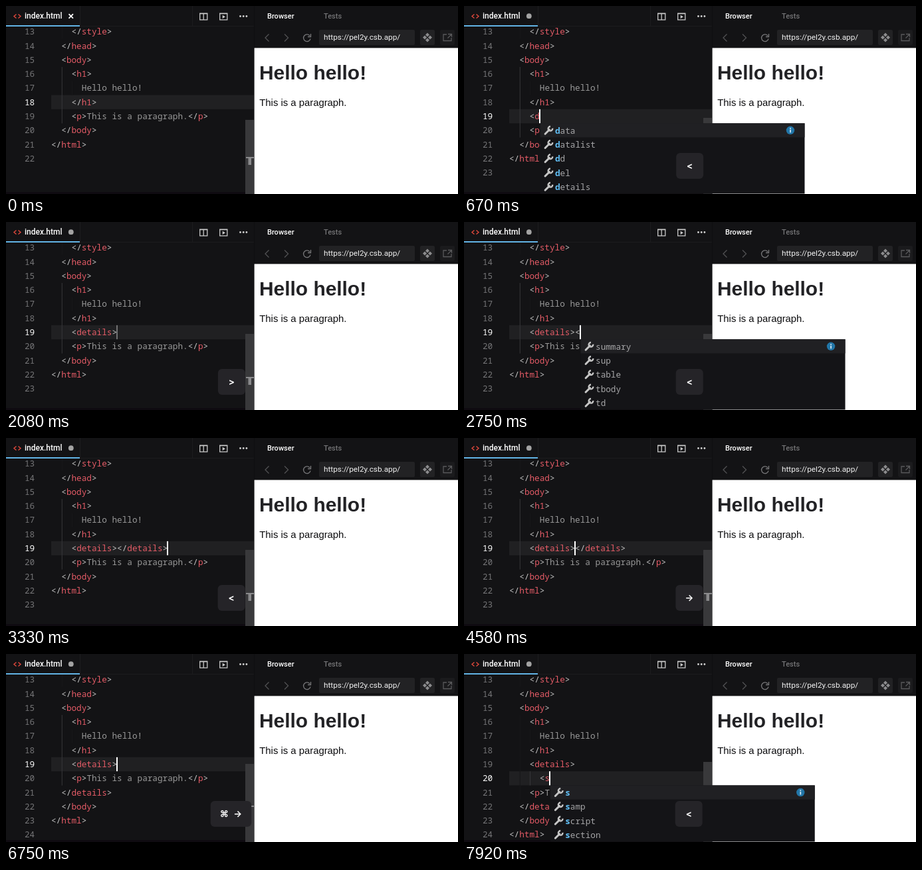
An HTML page for the animation above (8 s loop, 680 by 284 pixels).

```html
<!DOCTYPE html>
<html lang="en">
<head>
<meta charset="utf-8">
<title>Typing in a code editor</title>
<style>
  html, body { margin: 0; width: 100%; height: 100%; overflow: hidden; background: #131315; }
  svg { display: block; width: 680px; height: 284px; }
  text { white-space: pre; font: 500 12px Roboto, Inter, sans-serif; }
  .code text { font: 12.7px "Noto Sans Mono", "DejaVu Sans Mono", monospace; }
  .key { font: 700 13.5px Inter, "DejaVu Sans", sans-serif; fill: #fff; text-anchor: middle; }
  .tab { font-size: 11px; }
  .page { font-family: "Liberation Sans", Arial, sans-serif; font-weight: 400; }
  .line { fill: none; stroke: #c9c9c9; stroke-width: 1.3; }
</style>
</head>
<body>
<svg viewBox="0 0 680 284">
  <defs>
    <clipPath id="pane"><rect y="31" width="373" height="253"/></clipPath>
    <g id="wrench" fill="none" stroke="#c6c6c6">
      <path d="M1.6 12.4L8 6" stroke-width="3" stroke-linecap="round"/>
      <path d="M12.7 4A3.3 3.3 0 1 1 9.5 1.2" stroke-width="2.4"/>
    </g>
  </defs>
  <rect width="680" height="284" fill="#131315"/>
  <rect y="281" width="373" height="3" fill="#0f0b11"/>

  <path d="M15.5 12.5L12 15.5L15.5 18.5M18.5 12.5L22 15.5L18.5 18.5" fill="none" stroke="#e0483c" stroke-width="1.4"/>
  <text x="28" y="19.3" fill="#fff">index.html</text>
  <path id="close" d="M94.5 12.2L101 18.7M101 12.2L94.5 18.7" stroke="#fff" stroke-width="1.8"/>
  <circle id="unsaved" cx="97.8" cy="15.2" r="3.9" fill="#a3a3a3"/>
  <path d="M111.5 0V30.5H373M280.5 0V30" fill="none" stroke="#1c1c1e"/>
  <rect y="29" width="111" height="2" fill="#62b4e6"/>
  <g class="line">
    <path d="M291.7 11.2H302.8V20.8H291.7ZM297.2 11V21M291 11.7H303.5"/>
    <path d="M321.7 11.2H332.8V20.8H321.7ZM321 11.7H333.5"/>
  </g>
  <path d="M325.7 13.7L330 16.3L325.7 18.9Z" fill="#c9c9c9"/>
  <g fill="#d0d0d0"><circle cx="352.5" cy="15.5" r="1.4"/><circle cx="357.2" cy="15.5" r="1.4"/><circle cx="361.9" cy="15.5" r="1.4"/></g>

  <g class="code"><g id="editor" clip-path="url(#pane)"></g></g>

  <rect x="373" width="1" height="284" fill="#0e0e10"/>
  <text class="tab" x="393" y="19.3" fill="#fff">Browser</text>
  <text class="tab" x="478" y="19.3" fill="#747476">Tests</text>
  <g class="line" style="stroke:#515153">
    <path d="M395.5 42.5L390 48L395.5 53.5M419 42.5L424.5 48L419 53.5" stroke="#515153"/>
    <path d="M457.2 45.2A5.3 5.3 0 1 0 458 49.5M458.5 42V46.5H454" style="stroke:#767678"/>
  </g>
  <g fill="#222224">
    <rect x="471" y="36" width="144" height="23" rx="2"/>
    <rect x="623" y="36" width="22" height="23" rx="2"/>
    <rect x="653" y="36" width="22" height="23" rx="2" fill="#1b1b1d"/>
  </g>
  <text x="478" y="51.3" fill="#f2f2f2" style="font-size:11.8px;font-weight:400">https://pel2y.csb.app/</text>
  <path d="M634 40.5l3 3l-3 3l-3-3zM634 48.5l3 3l-3 3l-3-3zM630 44.5l3 3l-3 3l-3-3zM638 44.5l3 3l-3 3l-3-3z" fill="#8c8c8e"/>
  <path class="line" style="stroke:#59595b" d="M663 43H658V52.5H670V48M665 42.5H670.5V47M670.5 42.5L664.5 48.5"/>
  <rect x="373.6" y="63.4" width="307" height="221" fill="#fff"/>
  <text class="page" x="381" y="110.8" fill="#222225" style="font-size:29.9px;font-weight:700">Hello hello!</text>
  <text class="page" x="381.3" y="150.8" fill="#0c0c0e" style="font-size:14.85px">This is a paragraph.</text>

  <g id="popup" class="code"></g>
  <g id="keys"></g>
</svg>

<script>
const LOOP = 8000, FIRST = 13, LEFT = 68, CHAR = 7.63, ROW = 21.27;
const $ = id => document.getElementById(id);
const esc = s => s.replace(/</g, '&lt;').replace(/>/g, '&gt;');
const colX = col => LEFT + col * CHAR;
const rowY = line => 38.9 + (line - FIRST) * ROW;   // centre of a row
const indentOf = s => s.length - s.trimStart().length;

const rect = (x, y, w, h, fill, extra = '') =>
  `<rect x="${x}" y="${y}" width="${w}" height="${h}" fill="${fill}" ${extra}/>`;
const text = (x, y, body, fill = '#999', extra = '') =>
  `<text x="${x}" y="${y}" fill="${fill}" ${extra}>${body}</text>`;
const span = (s, fill) => `<tspan fill="${fill}">${esc(s)}</tspan>`;

// Editing actions: each changes the editor state
const type = s => e => {
  const old = e.lines[e.line - FIRST];
  e.lines[e.line - FIRST] = old.slice(0, e.col) + s + old.slice(e.col);
  e.col += s.length;
};
const newline = indent => e => {
  e.lines.splice(++e.line - FIRST, 0, ' '.repeat(indent));
  e.col = indent;
  e.dirty = true;
};
const go = (line, col) => e => { e.line = line; e.col = col; };
const select = (from, to) => e => { e.selection = [from, to]; e.col = to; };
const cut = e => {
  const [from, to] = e.selection, i = e.line - FIRST;
  e.lines[i] = e.lines[i].slice(0, from) + e.lines[i].slice(to);
  e.col = from;
  e.selection = null;
};
const paste = s => e => { e.lines[e.line - FIRST] = s; e.col = s.length; };
const press = keys => e => { e.keys = keys; };
const suggest = (items, match = 0) => e => {
  e.popup = items && { items: items.split(' '), match };
};

const TIMELINE = [
  [80, newline(4), press('↵')],
  [500, type('<'), press('<')],
  [580, suggest('a abbr address area article')],
  [670, type('d'), suggest('data datalist dd del details', 1)],
  [830, type('e'), suggest('del details', 2)],
  [920, type('t'), suggest('details', 3)],
  [1080, type('a'), suggest('details', 4)],
  [1170, type('i'), suggest('details', 5)],
  [1250, type('l'), suggest('details', 6)],
  [1420, type('s'), suggest('details', 7)],
  [1580, type('>'), suggest(''), press('>')],
  [2670, type('<'), press('<')],
  [2750, suggest('summary sup table tbody td')],
  [3000, type('/'), suggest('/details', 1)],
  [3330, type('details>'), suggest('')],
  [3750, go(19, 15), press('⌥←')],
  [4170, go(19, 12)],
  [4580, go(19, 13), press('→')],
  [4830, select(13, 23), press('⇧⌘→')],
  [5080, cut, press('⌘X')],
  [5330, go(20, 13), press('↓')],
  [5500, go(20, 31), press('⌘→')],
  [5830, newline(4), press('↵')],
  [6080, paste('  </details>'), press('⌘V')],
  [6330, go(20, 12), press('↑')],
  [6500, go(19, 12)],
  [6750, go(19, 13), press('⌘→')],
  [6920, newline(6), press('↵')],
  [7580, type('<'), press('<')],
  [7670, suggest('details summary sup table')],
  [7830, type('s'), suggest('s samp script section', 1)],
];

function stateAt(t) {
  const e = {
    lines: ['    </style>', '  </head>', '  <body>', '    <h1>', '      Hello hello!',
      '    </h1>', '    <p>This is a paragraph.</p>', '  </body>', '</html>', ''],
    line: 18, col: 9, keys: '', popup: null, selection: null, dirty: false,
  };
  for (const [at, ...actions] of TIMELINE) if (at <= t) actions.forEach(act => act(e));
  return e;
}

function caretOpacity(t) {
  if (t < 80) return 0;
  return t >= 2000 && t < 2670 ? Math.max(0, 1 - (t - 1920) / 250) : 1;
}

const highlight = code => code.replace(/(<\/?)(\w*)(>?)|[^<]+/g, (all, open, name, end) =>
  open ? span(open, '#c4c4c4') + span(name, '#e65c67') + span(end, '#c4c4c4') : span(all, '#999'));

// A line shares the caret's block when nothing between them is indented less
const sameBlock = (lines, a, b, level) =>
  lines.slice(Math.min(a, b), Math.max(a, b) + 1).every(s => indentOf(s) > level);

function drawEditor(e, t) {
  const caret = e.line - FIRST, current = e.lines[caret], top = rowY(e.line) - ROW / 2;
  const activeLevel = indentOf(current) - 2;
  let out = rect(LEFT, top, 305, ROW, '#202022');
  if (e.selection) {
    const [from, to] = e.selection;
    out += rect(colX(from), top, (to - from) * CHAR, ROW, '#3c3d42');
  }
  e.lines.forEach((code, i) => {
    const line = FIRST + i, y = rowY(line), indent = indentOf(code);
    for (let level = 2; level < indent; level += 2) {
      const active = level === activeLevel && sameBlock(e.lines, i, caret, level);
      out += rect(colX(level) + .5, y - ROW / 2, 1, ROW + .2, active ? '#37373a' : '#18181a');
    }
    out += text(28, y + 4.5, line, line === e.line ? '#fff' : '#757577');
    out += text(colX(indent), y + 4.5, highlight(code.trimStart()));
  });
  out += rect(Math.round(colX(e.col) - 1), top, 2, ROW, '#fff', `opacity="${caretOpacity(t)}"`);

  // Scrollbar with the caret marker
  const count = FIRST + e.lines.length - 1;
  const mark = 234 + 11 * (e.line - 19) - 5 * (count - 23);
  out += rect(360, 172 - 3 * (count - 22), 13, 284, '#39393b');
  out += rect(361, mark, 12, 2, '#8a8a8c');
  if (/<\/?\w+>$/.test(current.slice(0, e.col))) out += rect(364.5, mark, 4.5, 12, '#8a8a8c');
  return out;
}

function drawPopup({ popup, line, col }) {
  if (!popup) return '';
  const x = colX(col) + .7, top = rowY(line) + ROW / 2, width = 398;
  let out = rect(x, top, width, popup.items.length * ROW, '#141417') + rect(x, top, width, ROW, '#202023');
  popup.items.forEach((item, i) => {
    const y = top + (i + .5) * ROW, hit = item.slice(0, popup.match);
    out += `<use href="#wrench" x="${x + 6}" y="${y - 7}"/>`;
    out += text(x + 22.5, y + 4.9,
      `<tspan fill="#62bff5" font-weight="600">${hit}</tspan>` + span(item.slice(hit.length), '#a6a6a8'));
  });
  const infoY = top + ROW / 2;
  return out + `<circle cx="${x + 376.5}" cy="${infoY}" r="6.2" fill="#2276a8"/>`
    + rect(x + 375.7, infoY - 1, 1.7, 4.5, '#d8eaf5') + rect(x + 375.7, infoY - 3.7, 1.7, 1.7, '#d8eaf5');
}

function drawKeys({ keys }, t) {
  if (!keys) return '';
  const center = 339.8 - t * .0002, extra = keys.length - 1, width = 41 + 20.5 * extra;
  const glyphs = [...keys].map((key, i) =>
    text(center + (i - extra / 2) * 20.5, 246.2, esc(key), '#fff', 'class="key"')).join('');
  return `<g opacity="${Math.min(1, (t - 40) / 200)}">`
    + rect(center - width / 2, 222, width, 39, '#252428', 'rx="6"') + glyphs + '</g>';
}

function render(now) {
  const t = now % LOOP, e = stateAt(t);
  $('close').style.display = e.dirty ? 'none' : '';
  $('unsaved').style.display = e.dirty ? '' : 'none';
  $('editor').innerHTML = drawEditor(e, t);
  $('popup').innerHTML = drawPopup(e);
  $('keys').innerHTML = drawKeys(e, t);
}

let start;
function tick(now) {
  start ??= now;
  render(now - start);
  requestAnimationFrame(tick);
}
render(0);
requestAnimationFrame(tick);
</script>
</body>
</html>
```
